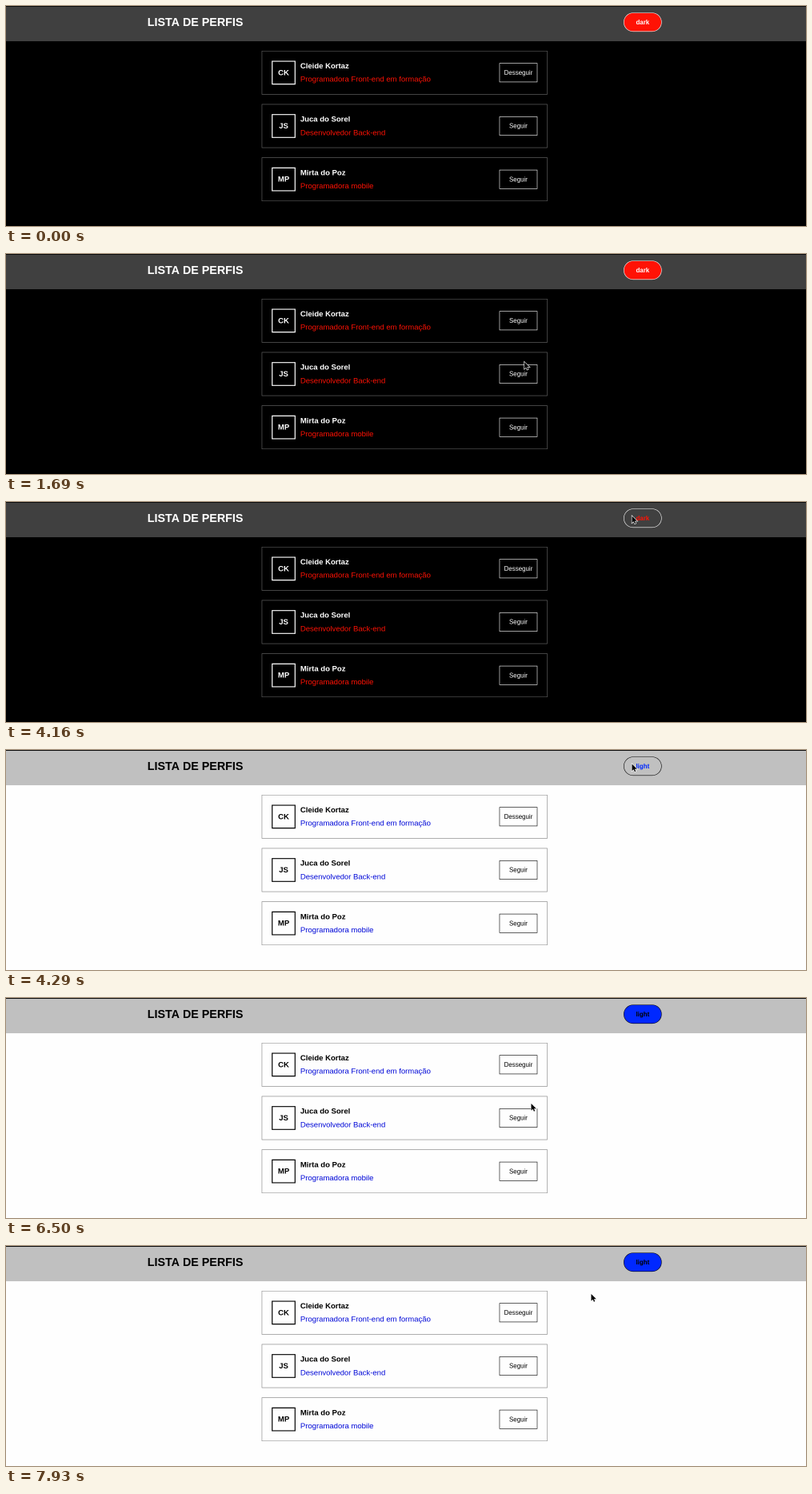
An HTML page with a canvas that plays this animation: 1000 by 275 pixels, repeating every 8000 ms.

```html
<!DOCTYPE html>
<html lang="pt-BR">
<head>
<meta charset="utf-8">
<title>Lista de perfis</title>
<style>
  html, body { margin: 0; width: 100%; height: 100%; overflow: hidden; background: #000; }
  canvas { display: block; width: 1000px; height: 275px; }
</style>
</head>
<body>
<canvas id="stage" width="1000" height="275"></canvas>
<script>
const stage = document.getElementById('stage').getContext('2d');

// The page is drawn at double size and halved, so thin lines and small text stay even
const sheet = document.createElement('canvas');
sheet.width = 2000;
sheet.height = 550;
const ctx = sheet.getContext('2d');

const LOOP = 8000, STEP = 130;
const UNIT = 1.68; // page pixels per stage pixel
const FONT = '"Liberation Sans", Arial, sans-serif';

const THEMES = {
  dark: { label: 'dark', page: '#000', header: '#404040', text: '#fff',
          accent: '#ff1205', role: '#ff1205', card: '#6c6c6c' },
  light: { label: 'light', page: '#fefefe', header: '#c0c0c0', text: '#000',
           accent: '#0028ff', role: '#0008d8', card: '#808080' }
};

const PROFILES = [
  { initials: 'CK', name: 'Cleide Kortaz', role: 'Programadora Front-end em formação', followed: true },
  { initials: 'JS', name: 'Juca do Sorel', role: 'Desenvolvedor Back-end', followed: false },
  { initials: 'MP', name: 'Mirta do Poz', role: 'Programadora mobile', followed: false }
];

const THEME_SWITCH = 4290;
const CLICKS = [[1170, 0], [2080, 1], [2730, 0], [3250, 1], [5200, 0], [5980, 0]];

// Pointer path: time, x, y in stage pixels
const PATH = [
  [130, 676, 253], [780, 646, 86], [1170, 646, 86], [1690, 648, 135], [1950, 646, 150],
  [2210, 646, 150], [2600, 645, 85], [3120, 645, 85], [3250, 646, 148], [3510, 646, 148],
  [4160, 782.5, 17.5], [4550, 782.5, 17.5], [4810, 780, 40], [5200, 654, 88],
  [5980, 654, 88], [6500, 656.5, 132], [6760, 652, 148], [7280, 652, 148], [7930, 731.5, 60]
];

const TOGGLE = { x: 1297, y: 14, w: 80, h: 40 };
const followButton = row => ({ x: 1036, y: 120 + row * 112, w: 80, h: 40 });

function pointerAt(t) {
  if (t < PATH[0][0]) return null;
  const i = PATH.findIndex(p => p[0] > t);
  if (i < 0) return { x: PATH.at(-1)[1] * UNIT, y: PATH.at(-1)[2] * UNIT };
  const [t0, x0, y0] = PATH[i - 1], [t1, x1, y1] = PATH[i];
  const k = (t - t0) / (t1 - t0), e = k * k * (3 - 2 * k);
  return { x: (x0 + (x1 - x0) * e) * UNIT, y: (y0 + (y1 - y0) * e) * UNIT };
}

function isOver(p, r) {
  return !!p && p.x >= r.x && p.x <= r.x + r.w && p.y >= r.y && p.y <= r.y + r.h;
}

function isFollowed(row, t) {
  const clicks = CLICKS.filter(([time, target]) => target === row && time <= t).length;
  return PROFILES[row].followed !== (clicks % 2 === 1);
}

function text(str, x, y, size, color, weight = 'normal', align = 'left') {
  ctx.font = `${weight} ${size}px ${FONT}`;
  ctx.textAlign = align;
  ctx.fillStyle = color;
  ctx.fillText(str, x, y);
}

// Box with its border inside the edge
function box({ x, y, w, h }, border, { fill, line = 1, radius = 0 } = {}) {
  ctx.beginPath();
  ctx.roundRect(x + line / 2, y + line / 2, w - line, h - line, radius);
  if (fill) {
    ctx.fillStyle = fill;
    ctx.fill();
  }
  ctx.strokeStyle = border;
  ctx.lineWidth = line;
  ctx.stroke();
}

function drawHeader(theme, pointer) {
  ctx.fillStyle = theme.header;
  ctx.fillRect(0, 0, 1680, 74);
  ctx.fillStyle = '#0c0c0c';
  ctx.fillRect(0, 0, 1680, UNIT);
  text('LISTA DE PERFIS', 297, 42, 24, theme.text, 'bold');

  const hover = isOver(pointer, TOGGLE);
  box(TOGGLE, theme.text, { fill: hover ? null : theme.accent, radius: 19.5 });
  text(theme.label, TOGGLE.x + 40, TOGGLE.y + 25, 13.333, hover ? theme.accent : theme.text, 'bold', 'center');
}

function drawProfile(row, theme, pointer, t) {
  const profile = PROFILES[row], y = 94 + row * 112;
  box({ x: 537, y, w: 600, h: 92 }, theme.card);

  box({ x: 558, y: y + 21, w: 50, h: 50 }, theme.text, { line: 2 });
  text(profile.initials, 583, y + 51, 16, theme.text, 'bold', 'center');
  text(profile.name, 618, y + 37, 16, theme.text, 'bold');
  text(profile.role, 618, y + 65, 16, theme.role);

  const button = followButton(row);
  box(button, theme.text, { fill: isOver(pointer, button) ? theme.accent : null });
  const label = isFollowed(row, t) ? 'Desseguir' : 'Seguir';
  text(label, button.x + 40, button.y + 24.5, 13.333, theme.text, 'normal', 'center');
}

function drawPointer({ x, y }) {
  ctx.save();
  ctx.translate(x, y);
  ctx.scale(0.88, 0.88);
  ctx.beginPath();
  ctx.moveTo(0, 0);
  ctx.lineTo(0, 16.5);
  ctx.lineTo(4, 13);
  ctx.lineTo(6.5, 18.5);
  ctx.lineTo(9, 17.5);
  ctx.lineTo(6.5, 12);
  ctx.lineTo(12, 12);
  ctx.closePath();
  ctx.strokeStyle = '#fff';
  ctx.lineWidth = 2.4;
  ctx.stroke();
  ctx.fillStyle = '#000';
  ctx.fill();
  ctx.restore();
}

function draw(time) {
  const t = Math.floor((time % LOOP) / STEP) * STEP;
  const theme = t < THEME_SWITCH ? THEMES.dark : THEMES.light;
  const pointer = pointerAt(t);
  ctx.setTransform(2 / UNIT, 0, 0, 2 / UNIT, 0, 0);
  ctx.fillStyle = theme.page;
  ctx.fillRect(0, 0, 1680, 462);
  drawHeader(theme, pointer);
  PROFILES.forEach((_, row) => drawProfile(row, theme, pointer, t));
  if (pointer) drawPointer(pointer);
  stage.drawImage(sheet, 0, 0, 1000, 275);
}

const start = performance.now();
function tick() {
  draw(performance.now() - start);
  requestAnimationFrame(tick);
}
tick();
</script>
</body>
</html>
```
